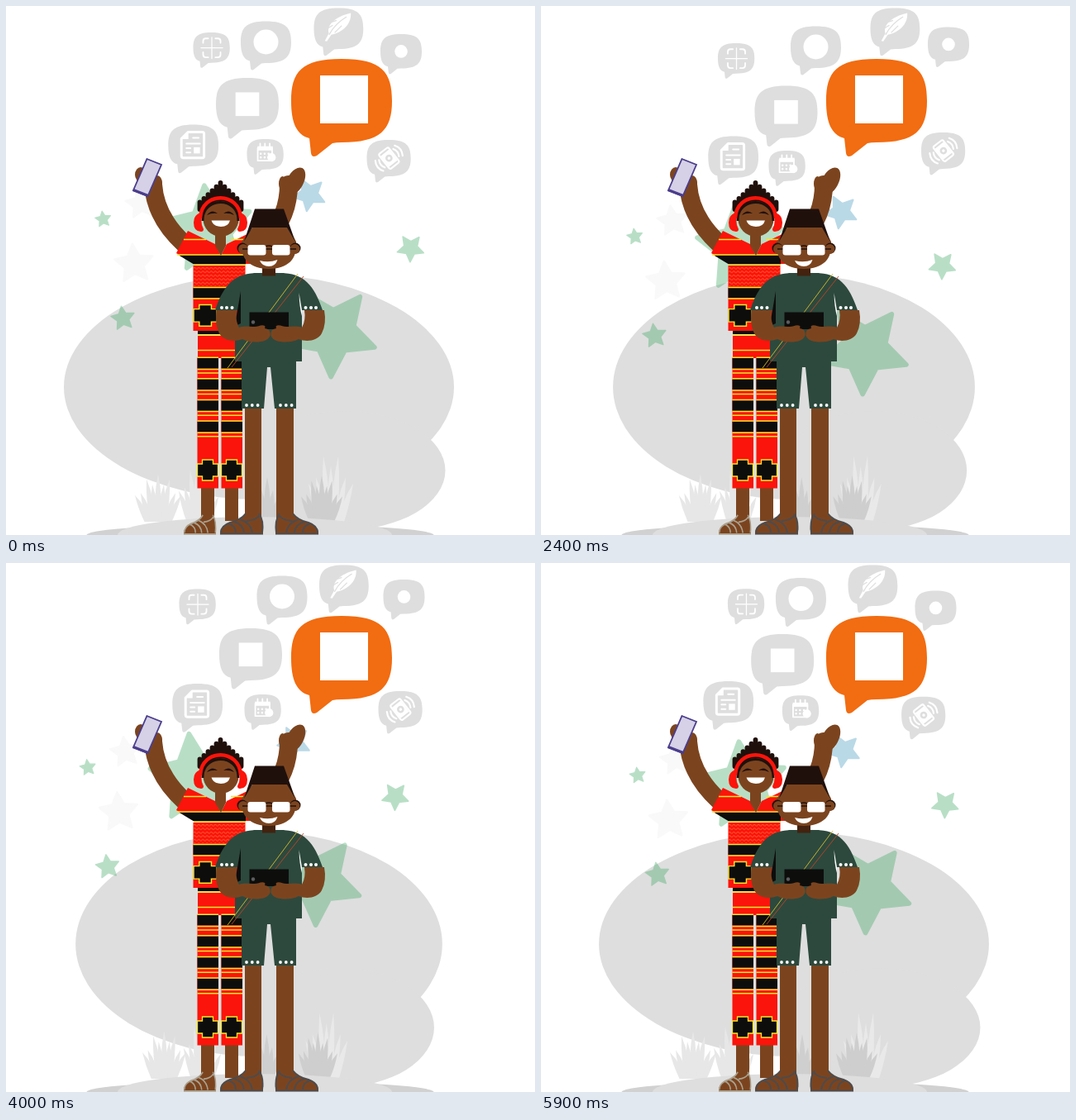
These frames come from a looping animation (640 px wide and 640 px high, 6 s). An HTML page:

```html
<!DOCTYPE html>
<html lang="en">
<head>
<meta charset="utf-8">
<title>Two friends with devices</title>
<style>
  html, body { margin: 0; width: 100%; height: 100%; overflow: hidden; background: #fff; }
  svg { display: block; width: 100vw; height: 100vh; }
  .skin { fill: #7b441f; } .arm { fill: none; stroke: #7b441f; stroke-linecap: round; }
  .red { fill: #fb140b; } .ink { fill: #0d0d0c; } .hair { fill: #20100c; }
  .cloth { fill: #2d493d; } .white { fill: #fff; } .grey { fill: #dedede; }
  .gold { fill: none; stroke: #f4e62c; stroke-width: 1.5; }
  .line { fill: none; stroke: #fff; stroke-linecap: round; stroke-linejoin: round; }
</style>
</head>
<body>
<svg viewBox="0 0 640 640">
  <defs>
    <path id="bubble" d="M0 51C0 16 12 0 61 0S122 16 122 51 108 101 61 101Q54 101 50 102L31 117Q25 120 24 114L22 96C6 92 0 76 0 51Z"/>
    <path id="block" d="M0 6h6v-5h13v5h6v15h-6v5h-13v-5h-6z" class="ink" style="stroke:#f4e62c;stroke-width:1.3"/>
    <pattern id="weave" width="5" height="4.5" patternUnits="userSpaceOnUse">
      <path d="M0 3h1.500l1-1.500h1.500l1 1.500" fill="none" stroke="#ff7440" stroke-width=".7"/>
    </pattern>
    <g id="sandal">
      <path class="skin" d="M47 2Q53 10 52 26H0Q0 17 12 13 25 10 32 1Z"/>
      <path d="M1 25Q1 17 12 13 25 10 31 2M10 14Q19 17 19 25M17 12Q28 15 29 25M24 9Q37 13 39 25M47 2Q53 10 51 25M32 11Q44 10 48 4M0 26.5H52"
        fill="none" stroke="currentColor" stroke-width="2"/>
    </g>
    <g id="sleeve">
      <path class="cloth" d="M320 323H304C276 323 263 338 253 368H280L290 345Z"/>
      <g class="white"><circle cx="261" cy="365" r="2"/><circle cx="267" cy="365" r="2"/><circle cx="273.500" cy="365" r="2"/></g>
    </g>
    <path id="forearm" class="skin" d="M255 368H279Q277 380 282 389C290 386 299 390 308 386.500Q315 385.500 313 390 321 391 319.500 399C316 407 304 407 295 406Q289 405 286 403C276 407 263 405 258 396Q252 384 255 368Z"/>
    <g id="trouser">
      <rect class="red" y="425" width="25.5" height="158.5"/>
      <g id="stripes"></g>
      <use href="#block" y="548"/>
    </g>
  </defs>

  <g id="land">
    <g class="grey"><ellipse cx="306" cy="461" rx="236" ry="136"/><ellipse cx="410" cy="562" rx="121.5" ry="72"/></g>
    <g id="grass"></g>
  </g>
  <ellipse cx="307.5" cy="640" rx="210" ry="13" fill="#d1d1d1"/>
  <ellipse cx="301" cy="640" rx="166" ry="22" class="grey"/>
  <g id="stars"></g>
  <g id="bubbles"></g>

  <g transform="translate(345 64)">
    <use href="#bubble" fill="#f26c11"/>
    <rect class="white" x="35" y="20" width="58" height="58"/>
  </g>

  <g id="woman">
    <path class="arm" stroke-width="22" d="M178 216C180 245 194 268 216 288M342 216C342 240 335 262 312 288"/>
    <g class="skin">
      <ellipse cx="163" cy="204" rx="7" ry="9"/><ellipse cx="183" cy="214" rx="6" ry="9"/>
      <ellipse cx="350" cy="212" rx="10" ry="18" transform="rotate(28 350 212)"/>
      <ellipse cx="334.5" cy="215" rx="4.5" ry="9"/>
    </g>
    <path d="M170.500 185L188 192 171.500 230 154 223Z" fill="#d6d1e6" stroke="#4b3d8c" stroke-width="1.800"/>
    <path d="M154.500 221L172.500 228 171.500 231 153 224Z" fill="#4b3d8c"/>

    <path class="red" d="M220 272L253 288 260 302 267 288 300 272V312H228L206 299Z"/>
    <path class="ink" d="M209 301.500H290V313H228Z"/>
    <path class="gold" d="M215 282.500H242M272 282.500H292M207 301H290M227 313H290"/>
    <path class="skin" d="M253 274H266V290L260 302 253 290Z"/>
    <rect class="red" x="226.500" y="314" width="63" height="79"/>
    <rect x="226.500" y="314" width="63" height="25" fill="url(#weave)"/>
    <path class="ink" d="M226.500 341h63v12h-63zM232 393h48v4h-48z"/>
    <path class="gold" d="M226.500 340.500h63M226.500 354h63"/>
    <use href="#block" transform="translate(227 360.500) scale(1.13 1.03)"/>
    <path class="red" d="M232 399H286V426H232Z"/>
    <path class="gold" d="M232 398H286M232 416.500H286"/>
    <path class="skin" d="M236 583h16v40h-16zM265 583h16v40h-16z"/>
    <use href="#trouser" x="231.500"/><use href="#trouser" x="260.500"/>
    <use href="#sandal" transform="translate(215 614) scale(.75 .94)" color="#aaa18f"/>

    <g id="crest" stroke="#20100c" stroke-width="5.8" stroke-linecap="round"></g>
    <circle class="skin" cx="260" cy="257.500" r="21.500"/>
    <path d="M238 260C237 230 282 230 281 260" fill="none" stroke="#20100c" stroke-width="3"/>
    <path d="M235 257C236 224 283 224 284 257" fill="none" stroke="#fb140b" stroke-width="4.500"/>
    <path class="red" d="M238 250Q227 251 227 262T236 273Q239 273 239 270 234 260 238 250ZM281 250Q292 251 292 262T283 273Q280 273 280 270 285 260 281 250Z"/>
    <path class="hair" d="M243 253Q249 245 256 251 249 250 243 253ZM263 251Q270 245 276 253 270 250 263 251Z"/>
    <path class="white" d="M248.500 259.500H271Q269 267 260 267T248.500 259.500Z"/>
  </g>

  <g id="man">
    <path class="skin" d="M289 485h20v138h-20zM327 485h21v138h-21z"/>
    <use href="#sandal" x="259" y="612" color="#4d4b4c"/>
    <use href="#sandal" transform="translate(378 612) scale(-1 1)" color="#4d4b4c"/>
    <path class="cloth" d="M285 428H351V487H325L320 437H316L312 487H285Z"/>
    <g id="hem" class="white"></g>
    <use href="#sleeve"/><use href="#sleeve" transform="translate(636) scale(-1 1)"/>
    <path class="cloth" d="M284 340L300 323H336L354 340 358 368V430H277V385Z"/>
    <path class="ink" d="M284 345V384Q278 388 277.500 383Z"/>
    <path class="white" d="M354.500 347L358 368V375Q355 365 354.500 347Z"/>
    <g fill="none" stroke-width=".9">
      <path d="M353 324L268 438" stroke="#d8bd2d"/>
      <path d="M360 327L273 437" stroke="#bd4427"/>
    </g>
    <rect class="ink" x="294.500" y="370.500" width="47.500" height="20.500"/>
    <circle cx="299" cy="382.500" r="2.200" fill="#5d5d60"/>
    <use href="#forearm"/><use href="#forearm" transform="translate(640) scale(-1 1)"/>

    <rect x="310" y="312" width="16" height="14.500" fill="#43220f"/>
    <path class="skin" d="M299 267H341L351 285C353 306 341 318 318 318S283 306 285 285Z"/>
    <circle class="hair" cx="286" cy="293" r="6.500"/><circle class="hair" cx="350" cy="293" r="6.500"/>
    <circle class="skin" cx="287" cy="294" r="6"/><circle class="skin" cx="349.500" cy="294" r="6"/>
    <path class="hair" d="M301 245.500H336L350 285 340 268H298L288 285Z"/>
    <path d="M286 294H351M314 291Q318 289 322 291" fill="none" stroke="#20100c" stroke-width="1.500"/>
    <rect class="white" x="292.500" y="289" width="22" height="12.500" rx="3"/>
    <rect class="white" x="322" y="289" width="21.500" height="12.500" rx="3"/>
    <path class="white" d="M307 308Q318 311 328.500 307 326 315 318 315T307 308Z"/>
  </g>
</svg>

<script>
const $ = id => document.getElementById(id);
const range = (n, f) => Array.from({ length: n }, (_, i) => f(i)).join('');

// Textile stripes, hair crest and hem dots
$('stripes').innerHTML = range(4, i => {
  const y = 426 + i * 25.6;
  return `<path class="ink" d="M0 ${y}h25.500v12.500h-25.500z"/>
    <path class="gold" d="M0 ${y - .8}h25.500m-25.500 14.200h25.500m-25.500 4.600h25.500"/>`;
});
$('crest').innerHTML = range(11, i => {
  const x = 234.5 + i * 5, y = 214 + Math.abs(i - 5) * 4.7;
  return `<path d="M${x} ${y}V${i % 10 ? 255 : 246}"/>`;
});
$('hem').innerHTML = range(6, i => `<circle cx="${291 + i % 3 * 6.8 + (i > 2 ? 41 : 0)}" cy="483" r="1.900"/>`);

// Grass: slim blades fan out from a base
const clump = (x, width, height, count, color) => range(count, i => {
  const u = i / (count - 1) * 2 - 1, base = x + u * width * .5, tip = x + u * width;
  const top = 624 - height * (1 - .45 * u * u) * (i % 2 ? .8 : 1);
  const bend = base + (tip - base) * .3, middle = (top + 624) / 2;
  return `<path fill="${color}" d="M${base - 2.5} 624Q${bend - 6} ${middle} ${tip} ${top}Q${bend + 6} ${middle} ${base + 2.5} 624Z"/>`;
});
$('grass').innerHTML = clump(184, 28, 58, 9, '#e7e7e7') + clump(233, 24, 68, 8, '#e7e7e7')
  + clump(316, 14, 54, 5, '#cfcfcf') + clump(393, 27, 84, 7, '#e9e9e9') + clump(382, 25, 56, 9, '#cecece');

// Stars: x, y, radius, angle, colour, opacity
const star = ([x, y, r, angle, color, opacity]) => {
  const points = Array.from({ length: 10 }, (_, i) => {
    const a = (angle + i * 36) * Math.PI / 180, d = r * (i % 2 ? .47 : .95);
    return [x + d * Math.cos(a), y + d * Math.sin(a)];
  });
  return `<polygon points="${points.join(' ')}" fill="${color}" stroke="${color}"
    stroke-width="${r * .1}" stroke-linejoin="round" opacity="${opacity}"/>`;
};
const green = '#37a65f';
$('stars').innerHTML = [
  [395, 394.5, 57, 20, green, .35], [245.5, 270.5, 56.5, -96, green, .35],
  [489.5, 293, 17.5, 20, green, .35], [117.5, 258, 10.5, -98, green, .35],
  [141.5, 378, 15.5, -98, green, .35], [367, 228, 21.5, 27, '#4d9cc2', .38],
  [155, 312, 25.5, -95, '#f9f9f9', 1], [163, 239, 20, -98, '#f9f9f9', 1]
].map(star).join('');

const icons = {
  scan: `<path class="line" stroke-width="5" d="M33 35V29Q33 20 42 20H50M74 20H82Q91 20 91 29V35M91 66V74Q91 83 82 83H74M50 83H42Q33 83 33 74V66"/>
    <path class="line" stroke-width="3.500" d="M26 51H98M62 16V87"/>`,
  disc: `<circle class="white" cx="61" cy="50" r="30"/>`,
  feather: `<path class="white" d="M27 81L37 62C31 43 51 21 91 12 93 32 80 57 43 66L32 82Z"/>
    <path class="line" style="stroke:#dedede" stroke-width="2.500" d="M38 65Q52 39 80 22M34 50L46 43M42 35L55 31M52 60L68 44"/>`,
  dot: `<circle class="white" cx="61" cy="51" r="19"/>`,
  square: `<rect class="white" x="38" y="28" width="46" height="46"/>`,
  sheet: `<path class="line" stroke-width="6" d="M48 18H83Q87 18 87 23V77Q87 81 83 81H37Q32 81 32 76V34Z"/>
    <path class="white" d="M49 17V35H32Z"/>
    <path class="line" stroke-width="4" d="M60 32H74M44 46H77M44 57H54M44 68H54"/>
    <rect class="white" x="62" y="55" width="15" height="15"/>`,
  calendar: `<path class="line" stroke-width="5" d="M36 30H84V72H36ZM44 15V27M60 15V27M76 15V27"/>
    <path class="white" d="M35 24H86V38H35Z"/>
    <path class="line" stroke-width="7" stroke-dasharray="0 13" d="M46 49H74M46 61H74"/>
    <circle class="white" cx="82" cy="61" r="14"/>`,
  phone: `<g transform="rotate(-38 61 50)"><rect class="line" stroke-width="5" x="44" y="25" width="34" height="52" rx="5"/>
    <path class="white" d="M46 32H76V70H46Z"/><circle class="grey" cx="61" cy="51" r="10"/><circle class="white" cx="61" cy="51" r="4"/>
    <path class="line" stroke-width="5" d="M86 38Q94 51 86 64M95 33Q107 51 95 69M36 38Q28 51 36 64M27 33Q15 51 27 69"/></g>`
};

// Positions at the key times, as offsets from the resting place
const keyTimes = [0, .8, 2.4, 3.3, 4, 4.9], loop = 6;
const bubbles = [
  { icon: 'scan', x: 226.5, y: 32, size: .363, dx: [0, 1.5, -12.5, -19.5, -17, -9.5], dy: [0, 8, 13, 7, -.5, -4] },
  { icon: 'disc', x: 284, y: 18.5, size: .5, dx: [0, 10, 18, 19, 19.5, 12], dy: [0, 2, 6, 4, -3, -5.5] },
  { icon: 'feather', x: 372.5, y: 2.5, size: .49, dx: [0, 10.5, 26, 22.5, 6.5, -5], dy: [0, 0, 0, 0, 0, 0] },
  { icon: 'dot', x: 453, y: 34, size: .41, dx: [0, 7.5, 15, 10.5, 3.5, -1], dy: [0, 1, -8.5, -14, -14, -9] },
  { icon: 'square', x: 254, y: 87, size: .623, dx: [0, -4, 4.5, 9, 4, -.5], dy: [0, 7.5, 9.5, 1, -8, -9.5] },
  { icon: 'sheet', x: 196.3, y: 143.5, size: .498, dx: [0, -.5, 6, 8.5, 5, 1.5], dy: [0, 7, 14, 9.5, 2.5, -2.5] },
  { icon: 'calendar', x: 291.5, y: 161, size: .363, dx: [0, -3, -16, -15, -3, 4], dy: [0, 9.5, 14, 5.5, -2, -5] },
  { icon: 'phone', x: 436.5, y: 162, size: .436, dx: [0, 13, 23.5, 18.5, 14, 8], dy: [0, .5, -9, -12, -7, -2.5] }
];
const starDrift = { node: $('stars'), x: 0, y: 0, size: 1, dx: [0, 1, -4, -14, -18.5, -10.5], dy: [0, 10.5, 21, 0, -10.5, -8] };

$('bubbles').innerHTML = bubbles.map(b => `<g><use href="#bubble" class="grey"/>${icons[b.icon]}</g>`).join('');
bubbles.forEach((b, i) => b.node = $('bubbles').children[i]);

// Smooth closed curve through the keys
function follow(keys, t) {
  const n = keys.length, wrap = k => (k + n) % n;
  const time = k => keyTimes[wrap(k)] + Math.floor(k / n) * loop;
  const gap = k => time(k + 1) - time(k);
  const slope = k => (keys[wrap(k + 1)] - keys[wrap(k)]) / gap(k);
  const tangent = k => (slope(k - 1) * gap(k) + slope(k) * gap(k - 1)) / (gap(k) + gap(k - 1));
  const i = keyTimes.filter(v => v <= t).length - 1;
  const h = gap(i), u = (t - time(i)) / h, w = 1 - u;
  return keys[i] * w * w * (1 + 2 * u) + keys[wrap(i + 1)] * u * u * (3 - 2 * u)
    + h * u * w * (w * tangent(i) - u * tangent(i + 1));
}

function draw() {
  const t = Math.floor(performance.now() % (loop * 1000) / 100) / 10;
  for (const p of [...bubbles, starDrift])
    p.node.setAttribute('transform', `translate(${p.x + follow(p.dx, t)} ${p.y + follow(p.dy, t)}) scale(${p.size})`);
  const stretch = .96 + .04 * Math.cos(t / loop * 2 * Math.PI);
  $('land').setAttribute('transform', `translate(306) scale(${stretch} 1) translate(-306)`);
  requestAnimationFrame(draw);
}
draw();
</script>
</body>
</html>
```
